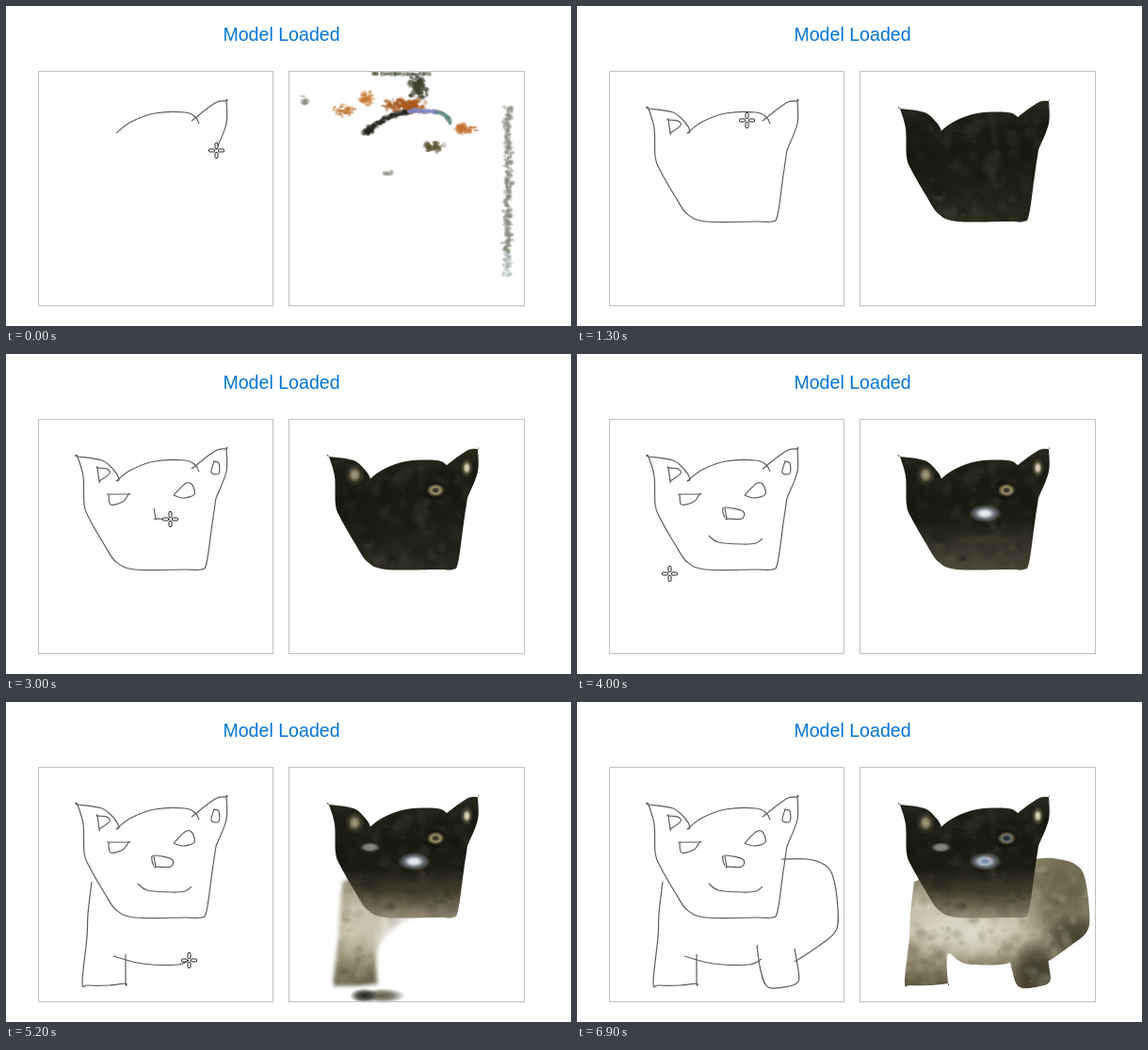
Write an HTML page with a canvas that moves like this. It is 600 px wide and 340 px high and loops after 7 s.

```html
<!DOCTYPE html>
<html lang="en">
<head>
<meta charset="utf-8">
<title>Sketch to picture</title>
<style>
  html, body { margin: 0; width: 100%; height: 100%; overflow: hidden; background: #fff; }
  canvas, svg { position: absolute; left: 0; top: 0; width: 600px; height: 340px; }
  text { font: 19.6px "Liberation Sans", Arial, sans-serif; fill: #0275d8; text-anchor: middle; }
  .panel { fill: none; stroke: #c0c0c4; }
  .ink path { fill: none; stroke: #5c5c5c; stroke-width: 1.2; }
  .cursor rect { fill: #fff; stroke: #222; }
</style>
</head>
<body>
<canvas id="view" width="600" height="340"></canvas>
<svg viewBox="0 0 600 340">
  <text x="292.5" y="36.5">Model Loaded</text>
  <rect class="panel" x="34.5" y="69.5" width="249" height="249"/>
  <rect class="panel" x="300.5" y="69.5" width="250" height="249"/>
  <g class="ink" id="ink"></g>
  <g class="cursor" id="cursor"></g>
</svg>
<script>
const LOOP = 7000, STEP = 100, CURSOR_END = 6200;
const SHIFT = 267; // from the sketch to the painted picture
const SVG = "http://www.w3.org/2000/svg";
const $ = id => document.getElementById(id);

function add(parent, tag, attrs) {
  const el = document.createElementNS(SVG, tag);
  for (const k in attrs) el.setAttribute(k, attrs[k]);
  return parent.appendChild(el);
}

/* ---------- pen strokes ---------- */

const parse = text => text.split(" ").map(p => p.split(",").map(Number));

// Smooth curve through all points; a doubled point makes a corner.
function curve(p) {
  let d = "M" + p[0];
  for (let i = 0; i < p.length - 1; i++) {
    const a = p[Math.max(i - 1, 0)], b = p[i], c = p[i + 1], e = p[Math.min(i + 2, p.length - 1)];
    const out = b.map((v, k) => v + (c[k] - a[k]) / 6);
    const into = c.map((v, k) => v - (e[k] - b[k]) / 6);
    d += `C${out} ${into} ${c}`;
  }
  return d;
}

const timeline = [];

function stroke(from, to, text) {
  const points = parse(text);
  const path = add($("ink"), "path", { d: curve(points) });
  const len = path.getTotalLength();
  const at = k => { const p = path.getPointAtLength(len * k); return [p.x, p.y]; };
  const s = { from, to, points, path, len, at };
  timeline.push(s);
  return s;
}

const hover = (t, place) => stroke(t, t + 10, `${place} ${place}`);

const crown = stroke(-20, -15, "117,135 133,123 158,114 190,113 201,118 205,125");
const ear = stroke(-10, -5, "197,122 222,103 234,101 234,101 234,125 223,153");
const jaw = stroke(0, 700, "223,153 219,180 213,222 207,229 190,229 137,229 117,221 104,202 88,174 83,160 82,130 76,109 76,109 102,113 115,124 120,133 117,135");
hover(800, "95,124");
const earLeft = stroke(850, 1100, "97,121 99,135 99,135 97,121 97,121 107,122 110,127 99,135");
const earRight = stroke(1400, 1700, "220,114 226,116 226,127 218,126 221,114");
hover(2000, "165,208");
const eyeLeft = stroke(2150, 2400, "109,149 109,149 130,149 130,149 124,157 111,160 109,149");
const eyeRight = stroke(2550, 2800, "178,150 190,138 197,138 200,149 188,153 178,150");
const nose = stroke(2900, 3150, "157,164 159,175 159,175 175,175 176,167 157,163 155,168 157,174");
const mouth = stroke(3350, 3700, "140,193 150,200 175,202 190,201 197,196");
hover(4000, "98,233");
const flank = stroke(4150, 4650, "91,191 87,225 86,250 81,298 87,301 110,301 127,299 127,299 127,268");
const belly = stroke(4800, 5210, "114,270 145,278 183,279 196,273");
const leg = stroke(5260, 5450, "191,258 195,285 203,303 225,302 235,297 235,285 231,262");
const back = stroke(5500, 5990, "217,167 245,167 263,173 272,186 277,220 275,243 257,259 231,276");

const clamp = v => Math.max(0, Math.min(1, v));

function cursorAt(t) {
  let prev = timeline[0];
  for (const s of timeline) {
    if (t < s.from) {
      const a = prev.at(1), b = s.at(0), k = (t - prev.to) / (s.from - prev.to);
      return a.map((v, i) => v + (b[i] - v) * k);
    }
    if (t <= s.to) return s.at((t - s.from) / (s.to - s.from));
    prev = s;
  }
  return prev.at(1);
}

for (let turn = 0; turn < 360; turn += 90) {
  add($("cursor"), "rect", { x: 2, y: -1.5, width: 6, height: 3, rx: 1, transform: `rotate(${turn})` });
}

/* ---------- painting tools ---------- */

function random(seed) {
  return () => (seed = (seed * 16807) % 2147483647) / 2147483647;
}

function layer() {
  const c = document.createElement("canvas");
  c.width = 600;
  c.height = 340;
  return c.getContext("2d");
}

function soft(g, x, y, rx, ry, color, alpha = 1) {
  g.save();
  g.translate(x, y);
  g.scale(rx, ry);
  const fill = g.createRadialGradient(0, 0, 0, 0, 0, 1);
  fill.addColorStop(0, color);
  fill.addColorStop(.5, color + "bb");
  fill.addColorStop(1, color + "00");
  g.globalAlpha = alpha;
  g.fillStyle = fill;
  g.fillRect(-1, -1, 2, 2);
  g.restore();
}

function ramp(y0, y1, ...colors) {
  const fill = layer().createLinearGradient(0, y0, 0, y1);
  colors.forEach((c, i) => fill.addColorStop(i / (colors.length - 1), c));
  return fill;
}

// Fills an outline joined from sketch points; later paint stays inside it.
function shape(points, fill, blur) {
  const g = layer();
  g.filter = `blur(${blur}px)`;
  g.fillStyle = fill;
  g.fill(new Path2D(curve(points.map(([x, y]) => [x + SHIFT, y])) + "Z"));
  g.filter = "none";
  g.globalCompositeOperation = "source-atop";
  return g;
}

function mottle(g, seed, y0, y1, light, dark) {
  const r = random(seed);
  for (let i = 0; i < 500; i++) {
    const size = 2 + r() * 8;
    soft(g, 343 + r() * 203, y0 + r() * (y1 - y0), size, size * (.5 + r()), r() < .5 ? light : dark, r() * .2);
  }
}

// Paints nested spots where a stroke was drawn, each smaller than the last.
function feature(g, { path }, ...colors) {
  const b = path.getBBox();
  colors.forEach((c, i) => {
    const k = .75 / (1 + i * .7);
    soft(g, b.x + b.width / 2 + SHIFT, b.y + b.height / 2, b.width * k, b.height * k, c);
  });
}

/* ---------- painted pictures ---------- */

function smear() {
  const g = layer(), r = random(77);
  const spread = () => (r() + r() + r()) / 1.5 - 1;
  const cloud = (x, y, w, h, color, n = w * h / 2) => {
    for (let i = 0; i < n; i++) {
      soft(g, x + spread() * w, y + spread() * h, 1.5 + r() * 3, 1.5 + r() * 2.5, color, .3 + r() * .5);
    }
  };
  g.rect(301, 70, 249, 248);
  g.clip();
  cloud(438, 86, 13, 17, "#3a3d28");
  cloud(424, 106, 29, 10, "#a8561d");
  cloud(358, 111, 13, 10, "#c47b35", 35);
  cloud(384, 98, 11, 10, "#c8792f", 35);
  cloud(487, 131, 15, 8, "#c0702d", 50);
  cloud(453, 150, 16, 9, "#5d5132", 45);
  cloud(405, 178, 8, 3, "#8b8d80", 10);
  cloud(317, 100, 5, 5, "#8b8d80", 10);
  cloud(385, 133, 9, 5, "#24241b");
  for (let x = 390; x < 452; x += 4) cloud(x, 72, 3, 1, "#4d5941", 2);
  for (let y = 108; y < 288; y += 4) cloud(533, y, 6, 4, y > 262 ? "#9fb0ae" : "#84897b", 5);
  for (let k = 0; k < 1; k += .03) {
    const [x, y] = crown.at(k), w = 5 * (1 - k);
    cloud(x + SHIFT, y - w / 2, w, w, k < .5 ? "#24241f" : k < .8 ? "#7f83bd" : "#648a85", 5);
  }
  return g.canvas;
}

const FACE = [...crown.points, ...ear.points, ...jaw.points];
const FRONT = [...flank.points, ...belly.points.slice(1), ...leg.points];
const BODIES = [
  [...flank.points, [135, 250], [170, 215], [120, 180]],
  [...FRONT, [216, 225], [120, 180]],
  [...FRONT, ...back.points.slice().reverse(), [120, 180]]
];

function body(n) {
  const fill = ramp(190, 302, "#8f886f", "#c9c3af", "#c6bfa9", "#958d73", "#5d573f");
  const g = shape(BODIES[n], fill, n ? .7 : 2);
  soft(g, 412, 245, 62, 32, n === 2 ? "#e0dccd" : "#cbc5b1", .9);
  if (n === 0) soft(g, 430, 260, 42, 55, "#ffffff");
  if (n === 1) {
    soft(g, 490, 288, 28, 28, "#2f2c20");
    soft(g, 479, 250, 20, 34, "#ffffff");
  }
  if (n === 2) {
    soft(g, 525, 205, 66, 70, "#6a664d");
    soft(g, 530, 250, 40, 26, "#3b3726", .9);
    soft(g, 488, 285, 28, 36, "#322e20", .9);
  }
  mottle(g, 31 + n, 170, 302, "#d8d3bd", "#4c472f");
  if (n === 0) {
    g.globalCompositeOperation = "destination-over";
    soft(g, 380, 312, 15, 8, "#1d2014");
    soft(g, 400, 312, 24, 8, "#5c5b45");
  }
  return g.canvas;
}

// Levels: 1 head, 2 ears, 3 right eye, 4 nose, 5 mouth, 6-8 body parts, 9 blue eyes
function cat(level) {
  const out = layer(), hasBody = level > 5;
  if (hasBody) out.drawImage(body(Math.min(level, 8) - 6), 0, 0);

  const chin = hasBody ? ["#4a4532", "#9a917a"] : level > 4 ? ["#37352a", "#4c493a"] : ["#22221a", "#2a291f"];
  const g = shape(FACE, ramp(100, 230, "#2a2a1e", "#1a1b13", "#181911", "#1c1c14", ...chin), .7);
  mottle(g, 11, 100, 230, "#57563f", "#0c0e08");
  if (level > 1) {
    feature(g, earLeft, "#4e4a36", "#a39a7d");
    feature(g, earRight, "#6b664d", "#d2c9ae", "#d8cfb6");
  }
  if (level > 2) feature(g, eyeRight, "#0f100b", "#b5a774", level > 8 ? "#4d6f9f" : "#c8b888", "#20241f");
  if (level > 3) feature(g, nose, "#98a0ad", "#dde1e9", level > 7 ? "#6d82a0" : "#e6e8ee");
  if (level > 4) feature(g, mouth, "#3b382a");
  if (hasBody) feature(g, eyeLeft, "#20211a", "#a0a397", "#7b837c");
  out.drawImage(g.canvas, 0, 0);
  return out.canvas;
}

const pictures = [
  [0, smear()],
  ...[1200, 1900, 2800, 3200, 3700, 4900, 5600, 6200, 6600].map((t, i) => [t, cat(i + 1)])
];

/* ---------- playback ---------- */

const view = $("view").getContext("2d");
let shown = null;

function render(t) {
  for (const s of timeline) {
    const k = clamp((t - s.from) / (s.to - s.from));
    s.path.style.visibility = k > 0 && s.len > 0 ? "visible" : "hidden";
    s.path.style.strokeDasharray = k < 1 ? `${s.len * k} ${s.len + 9}` : "none";
  }
  const [x, y] = cursorAt(t);
  $("cursor").setAttribute("transform", `translate(${Math.round(x) + .5} ${Math.round(y) + .5})`);
  $("cursor").style.visibility = t < CURSOR_END ? "visible" : "hidden";

  const picture = pictures.filter(p => p[0] <= t).pop()[1];
  if (picture !== shown) {
    view.clearRect(0, 0, 600, 340);
    view.drawImage(picture, 0, 0);
    shown = picture;
  }
}

const start = performance.now();
function tick() {
  const t = (performance.now() - start) % LOOP;
  render(Math.floor(t / STEP) * STEP);
  requestAnimationFrame(tick);
}
tick();
</script>
</body>
</html>
```
